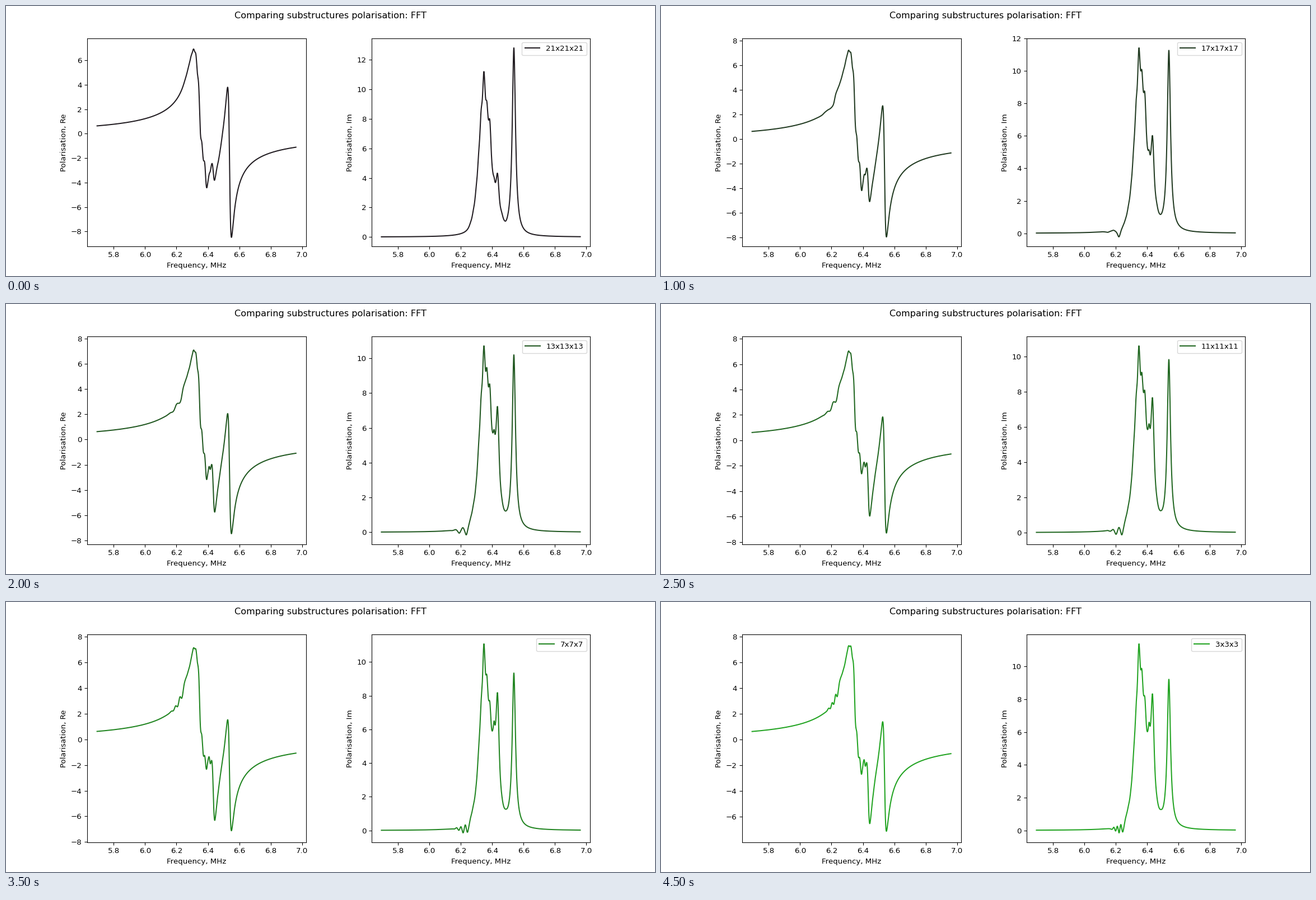
These frames come from a looping animation (1159x483 px, 5 s). A matplotlib script:

```python
import numpy as np
import matplotlib.pyplot as plt
from matplotlib.animation import FuncAnimation

SIZES = range(21, 2, -2)
FREQ = np.linspace(5.694, 6.961, 1400)
LINE_WIDTH = 0.0125   # damping of the resonances, MHz
OFFSET = -0.11        # constant shift of the real part

# Key points of the absorption band: frequency, height on the largest and smallest grid.
BAND, FIRST, LAST = np.array([
    (6.262, 1.0, 0.75), (6.280, 1.85, 1.5), (6.297, 3.3, 2.6), (6.313, 5.6, 4.8),
    (6.329, 8.5, 7.6), (6.347, 10.9, 11.07), (6.3575, 9.35, 9.5), (6.366, 9.3, 9.5),
    (6.385, 8.4, 8.0), (6.4025, 4.6, 6.05), (6.412, 4.05, 6.6), (6.4215, 3.7, 6.5),
    (6.434, 4.3, 8.3), (6.460, 1.7, 2.2), (6.4875, 1.1, 1.27), (6.538, 12.8, 9.22),
]).T


def ease_out(t):
    return 1 - (1 - t) ** 2.2


def settle(t):
    return 1 - np.exp(-18 * t)


def band_heights(t):
    """Eased heights plus a decaying wave that runs through the top of the band."""
    envelope = 0.75 * (1 - t / 2) * np.exp(-((BAND - 6.367) / 0.03) ** 4)
    wave = np.sin(7.5 * t + 0.5 - 37 * (BAND - 6.347))
    return FIRST + (LAST - FIRST) * ease_out(t) + envelope * wave


def ripple(t):
    """Ripple below the band: it closes up and moves towards the band edge."""
    order = np.arange(7)[::-1]
    distance = order * (0.0085 + 0.0545 * np.exp(-3.1 * t))
    nodes = 6.2435 - 0.065 * np.exp(-4.6 * t) - distance
    swing = -0.27 * (1 + (-1.0) ** order)
    return nodes, swing * settle(t) * np.exp(-(distance / 0.05) ** 2)


def fit(nodes, heights):
    """Sum of complex resonances whose imaginary part passes through the nodes."""
    width = np.minimum(LINE_WIDTH, 0.9 * np.gradient(nodes))

    def resonances(f):
        return width / (nodes - f[:, None] - 1j * width)

    strengths = np.linalg.solve(resonances(nodes).imag, heights)
    return lambda f: resonances(f) @ strengths


def polarisation(t):
    heights = band_heights(t)
    low, change = ripple(t)
    low_heights = fit(BAND, heights)(low).imag + change
    curve = fit(np.append(low, BAND), np.append(low_heights, heights))
    return curve(FREQ) + OFFSET


def padded(low, high):
    margin = 0.05 * (high - low)
    return low - margin, high + margin


fig, axes = plt.subplots(1, 2, figsize=(12, 5), dpi=96.6)
fig.subplots_adjust(left=0.125, right=0.9, bottom=0.11, top=0.88, wspace=0.3)
fig.suptitle("Comparing substructures polarisation: FFT")
lines = []
for ax, part in zip(axes, ("Re", "Im")):
    lines += ax.plot(FREQ, np.zeros_like(FREQ), lw=1.5)
    ax.set(xlabel="Frequency, MHz", ylabel=f"Polarisation, {part}",
           xlim=padded(FREQ[0], FREQ[-1]))


def draw(i):
    n = SIZES[i]
    t = i / (len(SIZES) - 1)
    curve = polarisation(t)
    for line, values in zip(lines, (curve.real, curve.imag)):
        line.set_ydata(values)
        line.set_color((0.13, 0.11 + 0.059 * i, 0.13))
    axes[0].set_ylim(padded(-8.44 + 1.2 * ease_out(t), 7.02 + 0.42 * settle(t)))
    axes[1].set_ylim(padded(curve.imag.min(), curve.imag.max()))
    lines[1].set_label(f"{n}x{n}x{n}")
    axes[1].legend(loc="upper right")
    return lines


anim = FuncAnimation(fig, draw, frames=len(SIZES), interval=500, repeat=True,
                     repeat_delay=0, blit=False)
plt.show()
```
